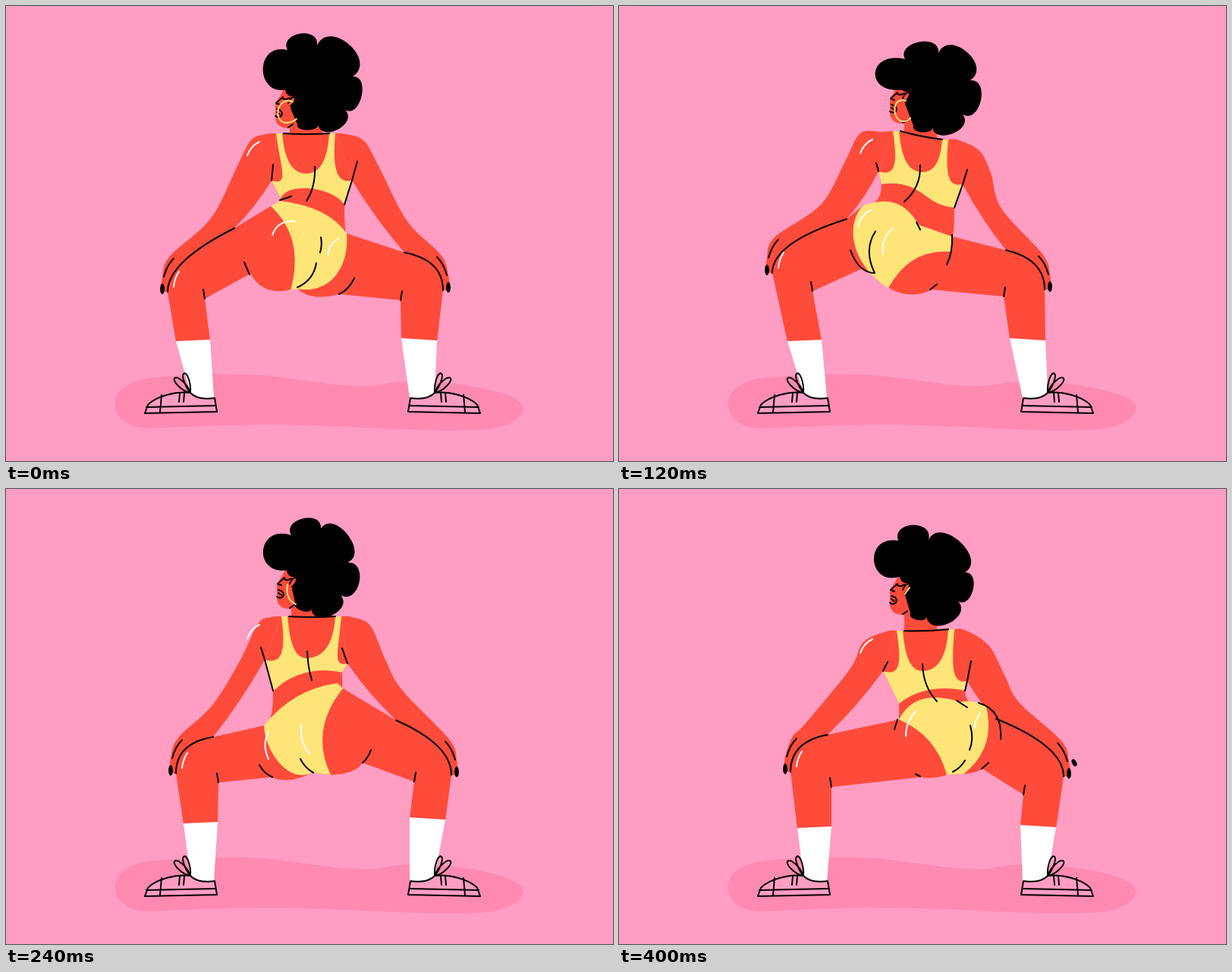
Write an HTML page with a canvas that moves like this. It is 800 by 600 pixels and loops after 0.48 s.

```html
<!DOCTYPE html>
<html lang="en">
<head>
<meta charset="utf-8">
<title>Dance</title>
<style>
html, body { margin: 0; width: 100%; height: 100%; overflow: hidden; background: #ff9dc3; }
canvas { display: block; }
</style>
</head>
<body>
<canvas id="stage" width="800" height="600"></canvas>
<script>
const ctx = document.getElementById('stage').getContext('2d');
const PINK = '#ff9dc3', SHADOW = '#ff8ab1', SKIN = '#ff4b3a', YELLOW = '#ffe478', BLACK = '#000', WHITE = '#fff';
const LOOP = 480, HOLD = 80;

const floor = 'M144 520C146 505 165 493 195 490Q270 483 340 487C390 492 440 503 485 501Q530 492 570 496C620 500 680 512 682 530C680 548 650 560 610 559C540 562 440 552 340 552Q260 553 190 557C160 558 140 540 144 520Z';

const shoe = {
  base: 'M243 510C225 508 198 514 187 526L183 537L278 535L275 517Q252 520 243 510Z',
  seams: 'M185 529L276 527M205 513L203 536M229 511L228 522M235 511L234 522',
  bow: 'M243 510C236 502 231 487 234 485C238 481 244 496 243 510C231 508 220 495 222 491C226 487 239 498 243 510'
};

const head = {
  skin: 'M370 113L363 125L357 134V154Q359 167 374 167H376V188H419V140L388 110Z',
  ear: 'M374 134Q377 125 383 126Q384 132 377 138',
  ink: 'M367 126L358 134L363 136M366 127Q370 131 376 127M359 142Q368 144 365 151Q361 154 357 151M359 146L363 149M374 166L380 162'
};

// Every track below has one entry for each of the six poses.
const headShift = [[-2, -6], [0, -12], [0, 0], [0, -9], [0, -12], [0, -1]];

// Left then right: thigh line start, knee, outer sock top, back of knee.
const legs = [
  [[301, 293, 213, 377, 224, 442, 262, 386], [525, 325, 576, 375, 568, 441, 520, 388]],
  [[300, 281, 202, 352, 222, 442, 255, 376], [510, 322, 561, 374, 562, 441, 507, 383]],
  [[305, 298, 215, 377, 227, 442, 267, 404], [524, 326, 575, 375, 571, 439, 522, 392]],
  [[273, 327, 224, 375, 234, 441, 280, 387], [514, 305, 587, 377, 579, 436, 538, 386]],
  [[294, 320, 239, 380, 243, 452, 294, 387], [506, 282, 599, 357, 579, 446, 544, 375]],
  [[275, 324, 226, 373, 235, 447, 280, 393], [497, 303, 586, 379, 576, 446, 533, 403]]
];

// Shoulder, upper arm and elbow on the outer edge.
const arms = [
  [[322, 178, 303, 215, 270, 280], [472, 178, 493, 215, 529, 284]],
  [[318, 168, 297, 207, 266, 262], [475, 191, 490, 220, 504, 267]],
  [[325, 197, 305, 233, 260, 302], [477, 195, 498, 236, 545, 300]],
  [[332, 178, 308, 227, 272, 285], [480, 180, 500, 225, 522, 265]],
  [[325, 185, 304, 225, 298, 262], [480, 173, 500, 203, 515, 240]],
  [[322, 202, 304, 238, 245, 310], [487, 206, 508, 245, 527, 281]]
];

// Left strap, right strap, neckline, armholes, lower corners, hem handles.
const tops = [
  [356, 168, 434, 168, 396, 221, 350, 230, 456, 230, 362, 254, 446, 262, 430, 238, 370, 232],
  [361, 165, 434, 176, 400, 219, 342, 218, 453, 235, 346, 235, 442, 266, 400, 262, 400, 228],
  [357, 188, 433, 188, 400, 241, 339, 253, 449, 242, 344, 273, 438, 267, 400, 271, 370, 272],
  [363, 168, 442, 168, 396, 223, 341, 225, 450, 230, 352, 267, 443, 242, 410, 234, 375, 243],
  [361, 171, 437, 163, 398, 222, 345, 238, 453, 216, 357, 279, 448, 235, 400, 230, 395, 270],
  [366, 187, 442, 185, 400, 240, 348, 240, 459, 253, 369, 283, 456, 266, 430, 260, 395, 262]
];

const waists = [
  [349, 264, 449, 300], [322, 263, 439, 304], [309, 296, 431, 303],
  [340, 312, 444, 263], [359, 302, 487, 276], [369, 304, 484, 287]
];

const briefs = [
  'L362 257Q425 265 449 300C453 345 426 381 384 373L375 375Q394 306 349 264',
  'C370 246 385 274 396 289L439 304L437 324Q383 320 355 372C305 340 298 287 322 263',
  'Q318 281 344 280Q410 262 431 303Q373 327 364 383L352 375L345 377Q304 335 309 296',
  'Q378 264 437 256L444 263Q400 318 428 377L404 374C372 390 341 345 340 312',
  'C400 288 405 256 445 256C503 256 510 330 443 371Q423 323 361 321',
  'Q390 262 450 281Q468 277 484 287Q497 342 454 376L432 377Q418 325 369 304'
];

const seats = [
  'L322 353Q336 378 365 376L384 372Q400 390 440 380',
  'L319 347L337 352L356 372Q384 388 413 374',
  'L320 372Q334 380 352 374L364 383Q392 393 413 381',
  'L350 380Q374 390 404 374L428 377Q460 376 470 361',
  'L388 374Q410 385 443 370L473 343',
  'L397 380Q414 383 432 377L454 376Q472 374 479 369'
];

// Hair cusps, each with the bulge of the lobe that follows it.
const hair = [
  [[374, 109, .66], [371, 58, .48], [410, 52, .46], [457, 93, .38], [447, 137, .45], [411, 156, .28], [384, 156]],
  [[376, 110, .97], [377, 70, .42], [421, 62, .46], [463, 98, .42], [453, 143, .43], [413, 159, .32], [388, 158]],
  [[369, 115, .5], [376, 60, .58], [414, 54, .42], [453, 89, .38], [446, 139, .42], [409, 157, .28], [386, 156]],
  [[372, 107, .76], [376, 61, .45], [415, 52, .4], [450, 97, .47], [441, 140, .45], [402, 158, .3], [381, 150]],
  [[370, 108, .88], [368, 64, .35], [409, 55, .36], [458, 106, .45], [441, 143, .25], [444, 163, .04], [384, 159]],
  [[372, 115, .72], [368, 68, .5], [408, 67, .4], [456, 110, .4], [447, 148, .45], [405, 168, .32], [384, 164]]
];

const armpitTicks = [
  [352, 209, 463, 205], [339, 207, 459, 216], [349, 235, 444, 229],
  [336, 209, 443, 210], [336, 215, 456, 203], [354, 228, 464, 227]
];

// Start x, end x, end y.
const spines = [[407, 396, 257], [397, 376, 258], [402, 392, 280], [397, 403, 252], [401, 414, 256], [400, 419, 280]];

const sideLines = [
  'M456 230L446 262M361 256L376 251',
  'M453 235L442 266M392 285L397 295M439 302Q440 325 432 341',
  'M303 311Q306 280 344 278M342 287C365 272 405 272 429 298M432 303L437 312',
  'M341 225L352 266',
  'M514 239L522 259M298 259Q295 270 290 281M359 298Q357 322 364 339',
  'M459 253L456 266M445 279L459 288M367 304L363 317M474 282Q506 292 503 330'
];

const hipLines = [
  'M314 338L321 354M384 371Q405 362 409 339M415 305Q417 315 414 325M439 380Q452 374 459 359',
  'M338 297Q322 322 337 352Q316 352 305 322M410 374L419 367',
  'M300 342Q305 365 320 372M338 346Q342 364 353 375M411 380L419 375',
  'M334 364Q340 375 351 380M388 356Q394 368 405 374M470 361Q477 355 481 344',
  'M456 294Q477 310 463 347M478 343Q490 335 495 319M374 366L389 374',
  'M463 312Q468 330 462 344M456 358Q450 368 440 373M391 376L397 379M478 369L487 361'
];

const shines = [
  'M351 302Q358 282 381 284M424 328Q425 315 438 307',
  'M315 290Q319 275 332 269M348 327Q345 307 361 293',
  'M311 321Q310 302 326 293M344 340Q338 315 357 296',
  'M346 320Q337 337 346 356M389 311Q387 335 400 349',
  'M380 314Q376 338 388 344M459 270Q458 287 463 293',
  'M378 326Q378 307 391 293M469 315Q469 304 476 295'
];

const hoops = [
  'M378 126C350 118 352 170 383 149', 'M378 125C354 118 362 166 384 148', 'M376 137C366 146 370 168 393 161',
  'M371 126Q368 146 382 152', 'M371 125Q370 138 380 143', 'M377 138L383 130'
];

const spareNails = { 2: [198, 361, .5], 5: [600, 361, -.5] };

function fill(path, color) {
  ctx.fillStyle = color;
  ctx.fill(new Path2D(path));
}

function stroke(path, color = BLACK) {
  ctx.strokeStyle = color;
  ctx.stroke(new Path2D(path));
}

function shifted(x, y, paint, flip = 1) {
  ctx.save();
  ctx.translate(x, y);
  ctx.scale(flip, 1);
  paint();
  ctx.restore();
}

// Smooth curve through points.
function spline(points) {
  const at = i => points[Math.max(0, Math.min(points.length - 1, i))];
  let path = `M${points[0]}`;
  for (let i = 0; i < points.length - 1; i++) {
    const [a, b, c, d] = [at(i - 1), at(i), at(i + 1), at(i + 2)];
    const out = [0, 1].map(k => b[k] + (c[k] - a[k]) / 6);
    const into = [0, 1].map(k => c[k] - (d[k] - b[k]) / 6);
    path += `C${out} ${into} ${c}`;
  }
  return path;
}

function hairPath(cusps, [hx, hy]) {
  let path = `M${cusps[0].slice(0, 2)}`;
  for (let i = 0; i < cusps.length - 1; i++) {
    const [x, y, bulge] = cusps[i], [u, v] = cusps[i + 1];
    const dx = u - x, dy = v - y, h = bulge * 4 / 3, w = Math.min(.25, bulge * .4);
    path += `C${x + dy * h - dx * w} ${y - dx * h - dy * w} ${u + dy * h + dx * w} ${v - dx * h + dy * w} ${u} ${v}`;
  }
  return path + `L${377 + hx} ${141 + hy}L${383 + hx} ${125 + hy}Q${372 + hx} ${127 + hy} ${370 + hx} ${117 + hy}Z`;
}

function topPath([lx, ly, rx, ry, nx, ny, ax, ay, bx, by, cx, cy, dx, dy, ...hem]) {
  const l = lx + 8, r = rx - 8;
  return `M${lx} ${ly}C${lx + 6} ${ly + (ay - ly) * .75} ${ax + 24} ${ay + 8} ${ax} ${ay}L${cx} ${cy}` +
    `C${hem[2]} ${hem[3]} ${hem[0]} ${hem[1]} ${dx} ${dy}L${bx} ${by}` +
    `C${bx - 20} ${by + 5} ${rx - 4} ${ry + (by - ry) * .75} ${rx} ${ry}L${r} ${ry}` +
    `C${r - 2} ${ry + (ny - ry) * .6} ${nx + (r - nx) * .65} ${ny} ${nx} ${ny}` +
    `C${nx + (l - nx) * .65} ${ny} ${l + 3} ${ly + (ny - ly) * .6} ${l} ${ly}Z`;
}

function torsoPath([lx, ly, rx, ry, , , ax, ay, bx, by, cx, cy, dx, dy], [wx, wy, vx, vy]) {
  return `M${lx} ${ly}L${ax} ${ay}L${cx} ${cy}Q${cx} ${wy} ${wx} ${wy}` +
    `L${vx} ${vy}Q${dx} ${vy} ${dx} ${dy}L${bx} ${by}L${rx} ${ry}Z`;
}

const sockInner = (x, y, side) => side < 0 ? [x + 45, y - 2] : [x - 47, y - 3];

function lowerPath([left, right], [wx, wy, vx, vy], seat) {
  const [px, py, kx, ky, sx, sy, bx, by] = left;
  const [qx, qy, mx, my, tx, ty, cx, cy] = right;
  return `M${wx} ${wy}L${px} ${py}Q${kx} ${ky - 40} ${kx} ${ky}L${sx} ${sy + 1}L${sockInner(sx, sy + 1, -1)}L${bx} ${by}` +
    seat + `L${cx} ${cy}L${sockInner(tx, ty + 1, 1)}L${tx} ${ty + 1}L${mx} ${my}Q${mx} ${my - 40} ${qx} ${qy}L${vx} ${vy}Z`;
}

function drawArm(side, outer, [px, py, kx, ky], strap, pit) {
  const points = [
    strap, [strap[0] + side * 14, strap[1] + 1],
    outer.slice(0, 2), outer.slice(2, 4), outer.slice(4),
    [kx - side * 3, ky - 47], [kx + side * 7, ky - 20], [kx + side * 8, ky]
  ];
  const bend = [(px + pit[0]) / 2 - side * 4, (py + pit[1]) / 2 + 3];
  fill(spline(points) + `L${kx} ${ky}Q${kx} ${ky - 40} ${px} ${py}Q${bend} ${pit}Z`, SKIN);
}

function drawLegInk(side, [px, py, kx, ky, , , bx, by]) {
  stroke(`M${px} ${py}Q${kx} ${ky - 40} ${kx} ${ky}`);
  stroke(`M${kx - side * 8} ${ky - 44}Q${kx + side} ${ky - 35} ${kx + side * 5} ${ky - 20}`);
  stroke(`M${bx + side * 2} ${by - 12}L${bx} ${by}`);
  drawNail([kx + side * 7, ky - 4]);
}

function drawNail([x, y, tilt = 0]) {
  ctx.fillStyle = BLACK;
  ctx.beginPath();
  ctx.ellipse(x, y, 2.9, tilt ? 5 : 7, tilt, 0, Math.PI * 2);
  ctx.fill();
}

function drawShoe() {
  fill(shoe.base, PINK);
  [shoe.base, shoe.seams, shoe.bow].forEach(path => stroke(path));
}

function drawFeet([left, right]) {
  const [x, y] = left.slice(4), [u, v] = right.slice(4);
  fill(`M${x} ${y}L${sockInner(x, y, -1)}L274 517Q254 520 243 510Z`, WHITE);
  fill(`M${sockInner(u, v, 1)}L${u} ${v}L565 510Q556 520 532 517Z`, WHITE);
  drawShoe();
  shifted(808, 0, drawShoe, -1);
}

function drawPose(i) {
  const top = tops[i], waist = waists[i], shift = headShift[i];
  const [lx, ly, rx, ry, , ny, ax, ay, bx, by] = top;
  const [kx, ky] = legs[i][0].slice(2);
  const [tx, ty, ux, uy] = armpitTicks[i];
  const [spineX, endX, endY] = spines[i];

  fill('M0 0H800V600H0Z', PINK);
  fill(floor, SHADOW);
  fill(lowerPath(legs[i], waist, seats[i]), SKIN);
  fill(torsoPath(top, waist), SKIN);
  drawArm(-1, arms[i][0], legs[i][0], [lx, ly], [ax, ay]);
  drawArm(1, arms[i][1], legs[i][1], [rx, ry], [bx, by]);
  shifted(...shift, () => fill(head.skin, SKIN));
  drawFeet(legs[i]);
  fill(topPath(top), YELLOW);
  fill(`M${waist.slice(0, 2)}` + briefs[i] + 'Z', YELLOW);
  fill(hairPath(hair[i], shift), BLACK);

  stroke(`M${lx + 10} ${ly}Q${(lx + rx) / 2} ${(ly + ry) / 2 + 2} ${rx - 8} ${ry}`);
  stroke(`M${tx} ${ty}L${ax} ${ay}M${ux} ${uy}L${bx} ${by}`);
  stroke(`M${spineX} ${ny - 9}Q${spineX + 1} ${ny - 9 + (endY - ny) * .75} ${endX} ${endY}`);
  stroke(sideLines[i] + hipLines[i]);
  drawLegInk(-1, legs[i][0]);
  drawLegInk(1, legs[i][1]);
  if (spareNails[i]) drawNail(spareNails[i]);

  shifted(...shift, () => {
    fill(head.ear, SKIN);
    stroke(head.ear);
    stroke(head.ink);
  });
  stroke(hoops[i], YELLOW);
  stroke(shines[i], WHITE);
  stroke(`M318 ${ly + 29}Q323 ${ly + 16} 334 ${ly + 11}`, WHITE);
  stroke(`M${kx + 8} ${ky - 7}Q${kx + 9} ${ky - 18} ${kx + 15} ${ky - 27}`, WHITE);
}

ctx.lineWidth = 2;
ctx.lineCap = ctx.lineJoin = 'round';

function tick() {
  drawPose(Math.floor(performance.now() % LOOP / HOLD));
  requestAnimationFrame(tick);
}
tick();
</script>
</body>
</html>
```
